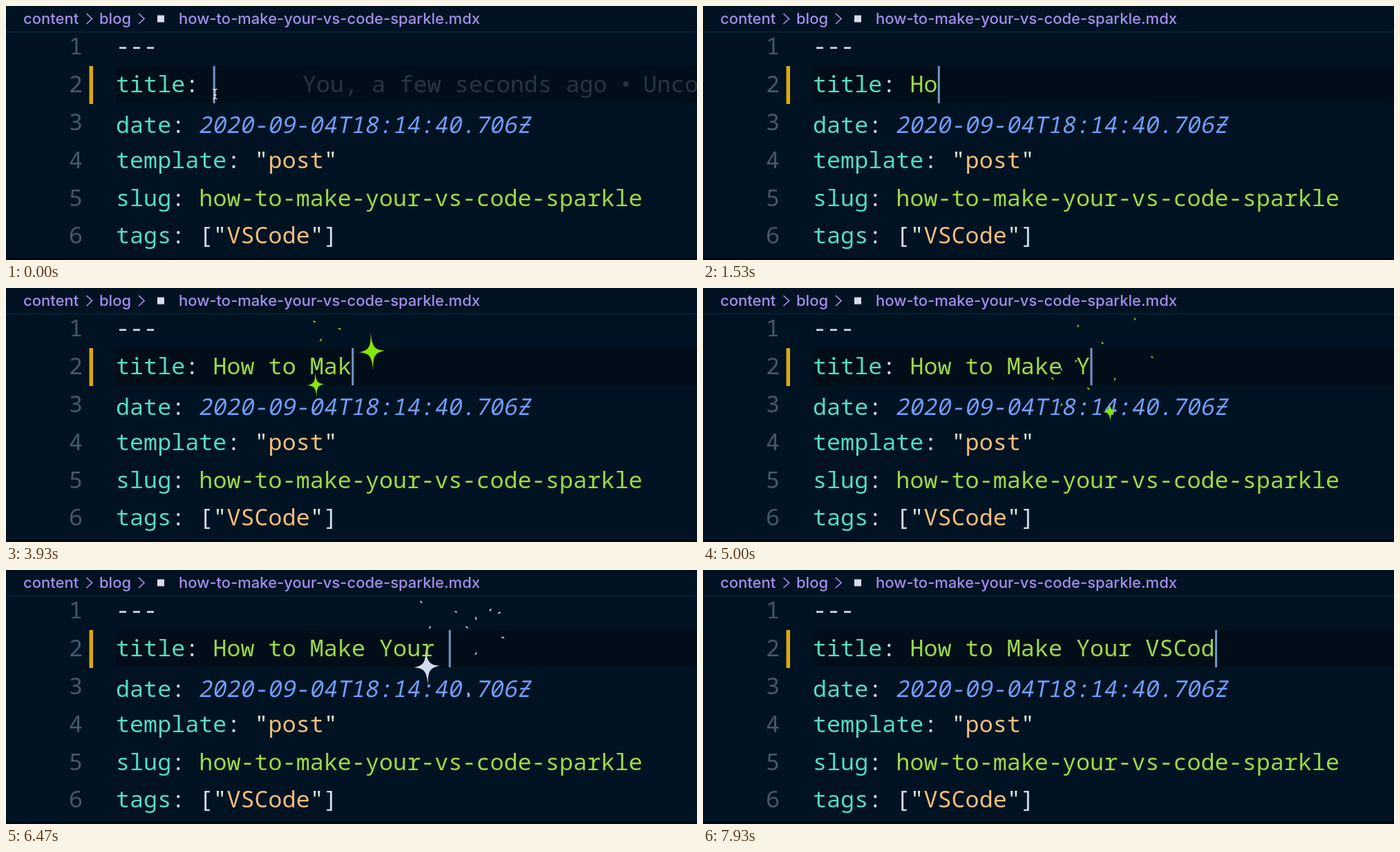
An HTML page for the animation above (8000 ms loop, 1000 by 368 pixels).

```html
<!DOCTYPE html>
<html lang="en">
<head>
<meta charset="utf-8">
<title>Sparkling editor</title>
<style>
html, body { margin: 0; width: 100%; height: 100%; overflow: hidden; background: #011322; }
svg { display: block; width: 100vw; height: 100vh; }
text { white-space: pre; }
.code { font: 33.43px "Noto Sans Mono", "DejaVu Sans Mono", monospace; fill: #d3dbea; font-variant-ligatures: none; }
.crumb { font: 500 22px Inter, Roboto, sans-serif; fill: #a28fec; }
.num { fill: #42596d; }
.key { fill: #55dcc2; }
.val { fill: #9ddb45; }
.date { fill: #709fff; }
.str { fill: #f4bf7c; }
.quote { fill: #d4f3dc; }
.ghost { fill: #263640; }
</style>
</head>
<body>
<svg viewBox="0 0 1000 368">
  <rect width="1000" height="368" fill="#011322"/>
  <rect y="36.5" width="1000" height="2" fill="#04202f"/>
  <rect y="364" width="1000" height="4" fill="#000b14"/>
  <rect x="159" y="87" width="841" height="54" fill="#010e19"/>
  <rect x="120.5" y="87" width="5.500" height="55" fill="#dca80f"/>

  <g class="crumb">
    <text x="25" y="26">content</text>
    <text x="135" y="26">blog</text>
    <text x="250" y="26">how-to-make-your-vs-code-sparkle.mdx</text>
  </g>
  <path d="M116.500 11l8 7.500-8 7.500M192 11l8 7.500-8 7.500" fill="none" stroke="#a28fec" stroke-width="1.700"/>
  <rect x="219" y="13.500" width="10" height="10" fill="#d6deeb"/>

  <g id="numbers" class="code num"></g>
  <g class="code">
    <text x="159" y="70">---</text>
    <text x="159" y="125"><tspan class="key">title</tspan>: <tspan class="val" id="typed"></tspan></text>
    <text x="159" y="184"><tspan class="key">date</tspan>:</text>
    <g transform="translate(278 184) skewX(-11)">
      <text class="date">2020-09-04T18:14:40.706Z</text>
      <path d="M464-12h14" stroke="#709fff" stroke-width="2.400"/>
    </g>
    <text x="159" y="235"><tspan class="key">template</tspan>: <tspan class="quote">"</tspan><tspan class="str">post</tspan><tspan class="quote">"</tspan></text>
    <text x="159" y="290"><tspan class="key">slug</tspan>: <tspan class="val">how-to-make-your-vs-code-sparkle</tspan></text>
    <text x="159" y="344"><tspan class="key">tags</tspan>: [<tspan class="quote">"</tspan><tspan class="str">VSCode</tspan><tspan class="quote">"</tspan>]</text>
  </g>

  <rect id="caret" y="87" width="3" height="54" fill="#7596c4"/>
  <g id="idle">
    <text class="code ghost" x="429" y="125">You, a few seconds ago<tspan x="887">•</tspan><tspan x="922">Uncommitted changes</tspan></text>
    <path d="M299.500 120.500q3 0 3 2.500v9q0 2.500-3 2.500M305.500 120.500q-3 0-3 2.500M305.500 134.500q-3 0-3-2.500M300.500 129h4" fill="none" stroke="#e4e8ee" stroke-width="1.300"/>
  </g>
  <g id="sparks"></g>
</svg>
<script>
const $ = id => document.getElementById(id);
const LOOP = 8000, FPS = 15, ADVANCE = 20.06;
const TITLE = "How to Make Your VSCod";

// Tick at which each letter of the title is typed
const KEYS = [15, 22, 27, 30, 33, 41, 45, 51, 55, 59, 63, 66, 69, 76, 81, 86, 92, 98, 103, 108, 113, 118];

// Stars of one burst, relative to the caret
const STARS = [
  { x: -20, y: -58, start: 0, size: 0.7, pieces: 3 },
  { x: 47, y: -21, start: 1, size: 1, pieces: 6 },
  { x: -34, y: 27, start: 2, size: 1, pieces: 6 },
  { x: 26, y: 66, start: 4, size: 0.85, pieces: 6 }
];
const CYCLE = 5, MAX_AGE = 15;
const GROWTH = [0.18, 0.68, 1];
const SHARDS = [[-23, -9], [29, 6], [-10, 29], [11, -34], [-10, -22], [24, -30]];

const star = (x, y, s) =>
  `<path transform="translate(${x} ${y}) rotate(-4) scale(${s})" ` +
  `d="M0-27C1-6 4-2 19 0C4 2 1 6 0 27C-1 6-4 2-19 0C-4-2-1-6 0-27Z"/>`;

function shards(x, y, { size, pieces }, late) {
  const reach = size * (late ? 1.38 : 1);
  const half = late ? 2.6 : 3;
  return SHARDS.slice(0, late ? Math.min(pieces, 4) : pieces).map(([dx, dy]) => {
    const turn = Math.atan2(dy, dx) * 180 / Math.PI + 12;
    return `<path transform="translate(${x + dx * reach} ${y + dy * reach}) rotate(${turn})" ` +
      `d="M${-half} 0L0-1.300L${half} .4L0 .9Z"/>`;
  }).join("");
}

function burst(age, x) {
  if (age < 1 || age >= MAX_AGE) return "";
  return STARS.filter(s => age >= s.start).map(s => {
    const life = (age - s.start) % CYCLE;
    const px = x + s.x, py = 113 + s.y;
    return life < 3 ? star(px, py, GROWTH[life] * s.size)
                    : shards(px, py, s, life === 4);
  }).join("");
}

$("numbers").innerHTML = [70, 125, 180, 235, 290, 344]
  .map((y, i) => `<text x="91" y="${y}">${i + 1}</text>`).join("");

let shown = -1;
function draw(tick) {
  const count = KEYS.filter(k => k <= tick).length;
  $("typed").textContent = TITLE.slice(0, count);
  $("caret").setAttribute("x", 299.7 + ADVANCE * count);
  $("idle").style.display = count ? "none" : "";

  // A burst follows its key one tick later and replaces the previous one
  const lit = KEYS.filter(k => k < tick).length;
  const sparks = $("sparks");
  sparks.setAttribute("fill", TITLE[lit - 1] === " " ? "#d3dcec" : "#86e80a");
  sparks.innerHTML = lit ? burst(tick - KEYS[lit - 1] - 1, 302 + ADVANCE * lit) : "";
}

const origin = performance.now();
function loop(now) {
  const t = Math.max(0, now - origin) % LOOP;
  const tick = Math.floor(t * FPS / 1000 + 0.06) % (LOOP * FPS / 1000);
  if (tick !== shown) draw(shown = tick);
  requestAnimationFrame(loop);
}
draw(0);
requestAnimationFrame(loop);
</script>
</body>
</html>
```
